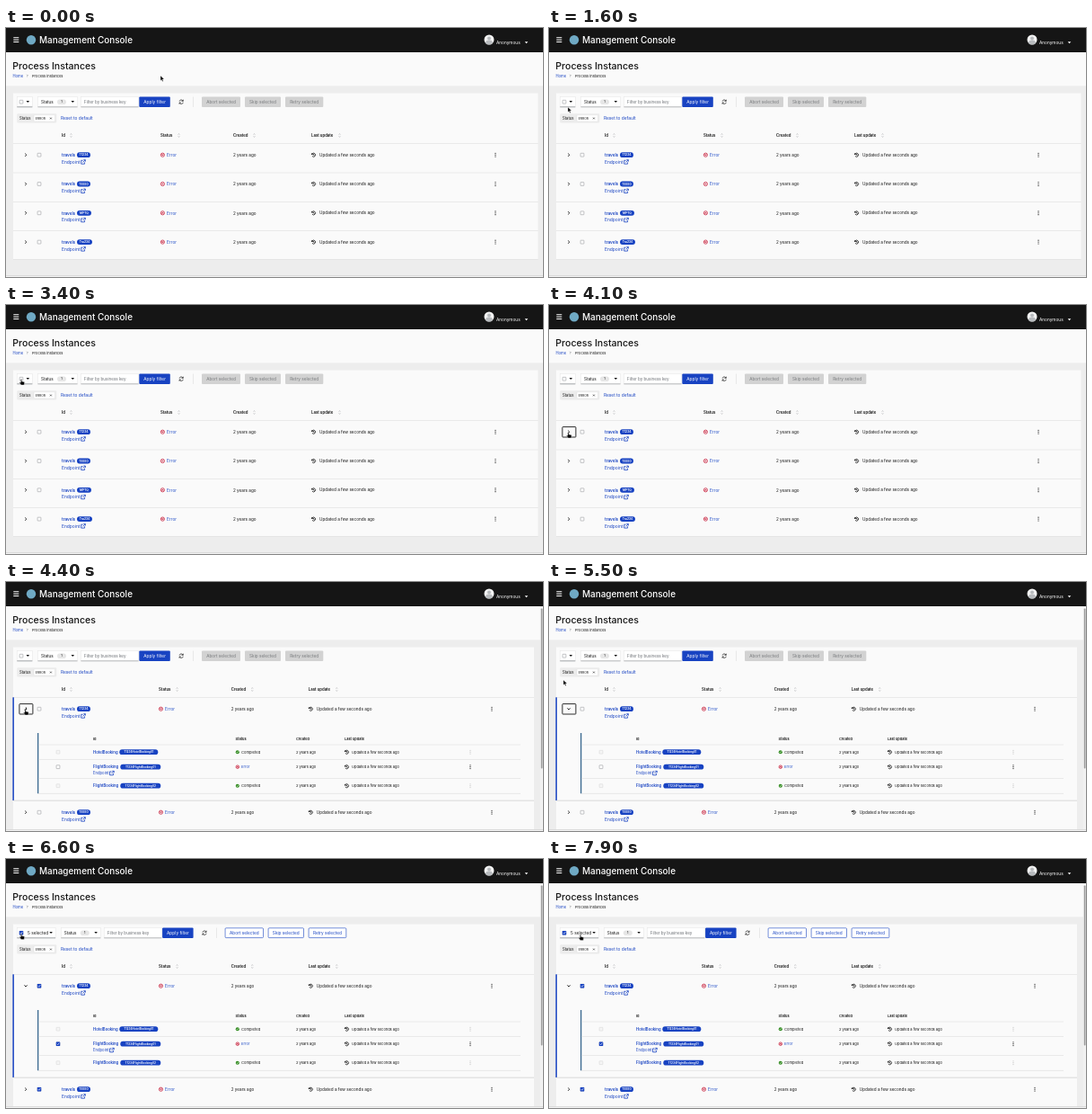
Animation of 598x277 px, one loop 8000 ms. Source, as an HTML page:

```html
<!DOCTYPE html>
<html lang="en">
<head>
<meta charset="utf-8">
<title>Process Instances</title>
<style>
html, body { margin: 0; width: 100%; height: 100%; overflow: hidden; background: #ededed; }
svg { display: block; width: 598px; height: 277px; font-family: Inter, Roboto, sans-serif; }
.tick, .sel .off, .on, #open, .open #closed, #focus, #hand { display: none; }
.sel .tick, .sel .on, .open #open, .focus #focus, .hand #hand { display: inline; }
.hand #arrow { display: none; }
</style>
</head>
<body>
<svg id="stage" viewBox="0 0 598 277" xmlns="http://www.w3.org/2000/svg"></svg>
<script>
const BLUE = '#1843c2', INK = '#151515', RED = '#c9243f', GREY = '#6a6e73', LINE = '#d6d6d6';
const stage = document.getElementById('stage');

const rect = (x, y, w, h, fill, more = '') =>
  `<rect x="${x}" y="${y}" width="${w}" height="${h}" fill="${fill}" ${more}/>`;
const text = (x, y, s, size, fill = INK, weight = 400, more = '') =>
  `<text x="${x}" y="${y}" font-size="${size}" fill="${fill}" font-weight="${weight}" ${more}>${s}</text>`;
const path = (d, stroke, w = 0.7, more = '') =>
  `<path d="${d}" fill="none" stroke="${stroke}" stroke-width="${w}" ${more}/>`;
const dot = (x, y, r, fill) => `<circle cx="${x}" cy="${y}" r="${r}" fill="${fill}"/>`;
const group = (more, ...parts) => `<g ${more}>${parts.join('')}</g>`;

const caret = (x, y, fill = INK) => `<path d="M${x - 1.8} ${y - 0.9}h3.6l-1.8 2z" fill="${fill}"/>`;
const chevron = (x, y, id = '') => path(`M${x - 0.8} ${y - 1.6}l1.6 1.6l-1.6 1.6`, INK, 0.9, id);
const kebab = (x, y, fill = INK) => [-1.9, 0, 1.9].map(d => dot(x, y + d, 0.6, fill)).join('');
const sorter = (x, y) => path(`M${x - 0.8} ${y - 0.9}l.8 -1l.8 1M${x - 0.8} ${y + 0.9}l.8 1l.8 -1`, '#a0a2a5', 0.6);

function check(x, y, dim) {
  const box = rect(x - 1.9, y - 1.9, 3.8, 3.8, dim ? '#f6f6f6' : '#fff',
    `stroke="${dim ? '#d0d0d0' : '#85878a'}" stroke-width=".5" rx=".4"`);
  return dim ? box : box + group('class="tick"',
    rect(x - 2.2, y - 2.2, 4.4, 4.4, BLUE, 'rx=".5"'),
    path(`M${x - 1.2} ${y}l.9 1l1.6 -2`, '#fff', 0.7));
}

function pill(x, y, w, s, size) {
  return rect(x, y - 2.9, w, 5.8, BLUE, 'rx="2.9"') +
    text(x + w / 2, y + size * 0.36, s, size, '#fff', 600, 'text-anchor="middle"');
}

function endpoint(x, y, size) {
  const ix = x + size * 4.42;
  return text(x, y + size * 0.36, 'Endpoint', size, BLUE) +
    path(`M${ix + 2} ${y - 1.6}h-2v3.9h3.9v-1.9M${ix + 2.7} ${y - 2.2}h2v2M${ix + 4.6} ${y - 2.1}l-2.7 2.7`, BLUE, 0.8);
}

function status(x, y, ok, size) {
  const r = size * 0.5;
  const mark = ok
    ? dot(x, y, r, '#2f8a1d') + path(`M${x - 1.1} ${y}l.8 .9l1.5 -1.8`, '#fff', 0.6)
    : `<circle cx="${x}" cy="${y}" r="${r - 0.3}" fill="none" stroke="${RED}" stroke-width=".8"/>` +
      path(`M${x - 0.9} ${y - 0.9}l1.8 1.8m0 -1.8l-1.8 1.8`, RED, 0.9);
  return mark + text(x + r + 2.2, y + size * 0.36, ok ? 'Completed' : 'Error', size, ok ? INK : RED === '' ? INK : '#2450c8');
}

function updated(x, y, size) {
  return path(`M${x - 1.7} ${y - 1.1}a2 2 0 1 1 .1 2.4M${x} ${y - 1.1}v1.3l1 .6`, INK, 0.8) +
    `<path d="M${x - 2.5} ${y - 2.3}v2.1h2.1z" fill="${INK}"/>` +
    text(x + size * 1.37, y + size * 0.36, 'Updated a few seconds ago', size);
}

const heads = (y, size, cols) => cols.map(([s, x, sx]) =>
  text(x, y + size * 0.36, s, size, INK, 600) + (sx ? sorter(sx, y) : '')).join('');

// shift: how far the columns move left when the scrollbar takes room
function row(y, code, w, shift, chevId = '') {
  return chevron(22, y, chevId) + check(37, y) +
    text(62, y + 1.7, 'travels', 4.65, BLUE, 600) + pill(79, y, w, code, 3.3) +
    endpoint(62, y + 7.7, 4.9) + status(174.4 - shift * 0.6, y, false, 4.75) +
    text(253 - shift * 0.7, y + 1.7, '2 years ago', 4.6) +
    updated(342.6 - shift, y, 4.68) + kebab(545 - shift * 1.25, y);
}

const columns = s => heads(119.5, 4.3, [['Id', 62, 72.5], ['Status', 172 - s * 0.6, 192.5 - s * 0.6],
  ['Created', 253 - s * 0.7, 276.5 - s * 0.7], ['Last update', 340 - s, 371.5 - s]]);

const line = (x, y, w) => rect(x, y - 0.25, w, 0.5, LINE);

function closedTable() {
  const codes = [['T1234', 15], ['TEEE0', 15], ['MPTQ', 16], ['Tra234', 17]];
  return group('id="closed"', rect(8, 72.5, 584.5, 185, '#fafafa'), columns(0),
    codes.map(([c, w], i) => line(8, 128.7 + i * 32.3, 584.5) + row(141.2 + i * 32.3, c, w, 0)).join(''),
    line(8, 257.7, 584.5));
}

function child(y, name, code, x, w, ok) {
  const dim = ok ? '#c4c4c4' : INK;
  return check(58, y, ok) + text(97, y + 1.5, name, 4.25, BLUE, 600) + pill(x, y, w, code, 3.15) +
    (ok ? '' : endpoint(97, y + 6.8, 4.2)) + status(257.8, y, ok, 4.1) +
    text(323, y + 1.45, '2 years ago', 4) + updated(379.5, y, 4) + kebab(517, y, dim);
}

function openTable() {
  return group('id="open"', rect(8, 72.5, 580, 204, '#fafafa'), columns(3.2),
    line(8, 128.5, 580), row(141.2, 'T1234', 15, 3.2, 'id="chev"'),
    rect(7.4, 128.3, 1.5, 114.7, BLUE),
    rect(35, 168, 1.3, 67.3, '#39688f'),
    heads(175, 3.9, [['Id', 97], ['Status', 255.5], ['Created', 323], ['Last update', 377]]),
    [181, 197.5, 218.6, 235.2].map(y => line(36, y, 537)).join(''),
    child(189.2, 'HotelBooking', 'T1234HotelBooking01', 126.3, 43, true),
    child(205.7, 'FlightBooking', 'T1234FlightBooking01', 127.3, 45, false),
    child(226.7, 'FlightBooking', 'T1234FlightBooking02', 127.3, 45, true),
    rect(8, 242.8, 580, 0.6, '#c4c4c4'), row(256.2, 'TEEE0', 15, 3.2),
    rect(594.8, 27, 3.2, 248, '#f1f1f1'), rect(595.8, 29.5, 1.7, 178, '#9c9c9c', 'rx=".8"'));
}

function button(x, w, s) {
  const label = (c, cls) => text(x + w / 2, 83.9, s, 4.72, c, 400, `text-anchor="middle" class="${cls}"`);
  return rect(x, 76.5, w, 11.4, '#d2d2d2', 'rx="1" class="off"') + label('#77797c', 'off') +
    rect(x + 0.3, 76.8, w - 0.6, 10.8, '#fff', `rx="1" class="on" stroke="${BLUE}" stroke-width=".6"`) + label(BLUE, 'on');
}

function toolbar() {
  const field = (x, w) => rect(x, 76.5, w, 11.4, '#fff', 'stroke="#e6e6e6" stroke-width=".5"') +
    rect(x, 87.6, w, 0.6, '#8a8d90');
  const rest = group('id="rest"',
    field(35.5, 44), text(39, 83.8, 'Status', 4.6), rect(57, 79.4, 10, 5.6, '#e6e6e6', 'rx="2.8"'),
    text(62, 83.4, '1', 3.3, INK, 500, 'text-anchor="middle"'), caret(74.3, 82),
    field(83.5, 64), text(87, 83.8, 'Filter by business key', 4.55, GREY),
    rect(148.3, 76.5, 34.5, 11.4, BLUE, 'rx="1"'),
    text(165.6, 83.8, 'Apply filter', 4.8, '#fff', 400, 'text-anchor="middle"'),
    path('M193.1 81.6a2.1 2.1 0 0 1 3.8 -.7M197.3 82.8a2.1 2.1 0 0 1 -3.8 .7M197.3 79.7v1.7h-1.7M193.1 84.7v-1.7h1.7', INK, 0.7),
    rect(208.3, 76.5, 0.5, 11.4, LINE),
    button(218, 43, 'Abort selected'), button(266, 40, 'Skip selected'), button(311, 42.3, 'Retry selected'));
  const toggle = rect(12.3, 76.5, 17, 11.4, '#fff', 'id="toggle" stroke="#e6e6e6" stroke-width=".5"') +
    rect(12.3, 87.6, 17, 0.6, '#6a6e73', 'id="under"') + check(17, 82.2) +
    text(24, 83.8, '', 4.75, INK, 400, 'id="count" class="on"') + group('id="drop"', caret(24.3, 82));
  const chips = rect(12.3, 95.3, 44, 10.3, '#ececec', 'rx="1"') + text(15, 102, 'Status', 4.2) +
    rect(31, 96.8, 23.5, 7.2, '#fff', 'rx="1" stroke="#dcdcdc" stroke-width=".4"') +
    text(32.8, 101.7, 'ERROR', 3.4) + path('M49 99.6l1.8 1.8m0 -1.8l-1.8 1.8', INK, 0.6) +
    text(61, 102.1, 'Reset to default', 4.8, BLUE);
  return toggle + rest + chips;
}

function frame() {
  const bars = [10.7, 13.1, 15.5].map(y => rect(8.3, y - 0.45, 6, 1, '#fff')).join('');
  return rect(0, 0, 598, 27, INK) + bars + dot(28, 13.2, 5.2, '#6fa9c4') +
    text(37, 17.1, 'Management Console', 9.95, '#fff', 500) +
    group('', dot(538, 13, 5.5, '#f2f2f2'), dot(538, 11.4, 2, '#b8bbbe'),
      `<path d="M534.1 16.9a3.9 3.3 0 0 1 7.8 0a5.5 5.5 0 0 1 -7.8 0z" fill="#b8bbbe"/>`) +
    text(546, 18.1, 'Anonymous', 4.75, '#fff') + caret(579.5, 16.2, '#fff') +
    rect(0, 27, 598, 37.3, '#fafafa') + text(7.3, 46, 'Process Instances', 10.6, INK, 500) +
    text(7.4, 54.5, 'Home', 4.2, BLUE) + path('M23.2 51.8l1.2 1.2l-1.2 1.2', GREY, 0.6) +
    text(29, 54.5, 'Process instances', 4);
}

const cursor = group('id="cursor"',
  `<path id="arrow" d="M0 0v5.6l1.3 -1.2l.9 2l1 -.4l-.9 -2h1.8z" fill="#000" stroke="#fff" stroke-width=".35"/>`,
  `<path id="hand" d="M-.6 .3q.6 -.8 1.2 0v2.2l2.5 .6q.6 .2 .5 .9l-.4 2.4h-3.3l-2 -2.6q.2 -.8 1.5 0z" fill="#000" stroke="#fff" stroke-width=".35"/>`);

stage.innerHTML = rect(0, 0, 598, 277, '#ededed') + frame() + closedTable() + openTable() + toolbar() +
  rect(14.9, 135.6, 15, 11.4, 'none', 'id="focus" stroke="#151515" stroke-width=".9" rx=".6"') +
  rect(0, 275, 598, 0.8, '#cfcfcf') + rect(0, 275.8, 598, 1.2, '#f2f2f2') + cursor;

const $ = id => document.getElementById(id);
const clamp = v => Math.max(0, Math.min(1, v));

// time, x, y
const route = [[800, 172, 53], [1600, 21, 88], [1700, 17, 83], [3400, 17, 82.5], [4000, 21.5, 141.5],
  [5000, 21.5, 141.5], [5500, 16, 109], [5900, 17, 86], [6100, 17, 83], [7600, 17, 83], [7900, 35, 84]];

function place(t) {
  let i = 0;
  while (i < route.length - 2 && t > route[i + 1][0]) i++;
  const [a, b] = [route[i], route[i + 1]];
  const k = clamp((t - a[0]) / (b[0] - a[0])), e = k * k * (3 - 2 * k);
  return [a[1] + (b[1] - a[1]) * e, a[2] + (b[2] - a[2]) * e];
}

function draw(now) {
  const t = Math.floor(now % 8000 / 100) * 100;
  const sel = t >= 1800 && t < 3200 || t >= 6600, open = t >= 4400;
  const [x, y] = place(t);
  const hand = x < 55 && (y > 76 && y < 87.5 || y > 135);
  stage.setAttribute('class', [sel && 'sel', open && 'open', t >= 4100 && t < 6300 && 'focus', hand && 'hand']
    .filter(Boolean).join(' '));
  $('cursor').setAttribute('transform', `translate(${x} ${y})`);
  $('chev').setAttribute('transform', `rotate(${90 * clamp((t - 4300) / 300)} 22 141.2)`);
  $('count').textContent = open ? '5 selected' : '4 selected';
  const shift = sel ? 25.8 : 0;
  for (const id of ['rest', 'drop']) $(id).setAttribute('transform', `translate(${shift} 0)`);
  for (const id of ['toggle', 'under']) $(id).setAttribute('width', 17 + shift);
}

const start = performance.now();
function tick() {
  draw(performance.now() - start);
  requestAnimationFrame(tick);
}
tick();
</script>
</body>
</html>
```
